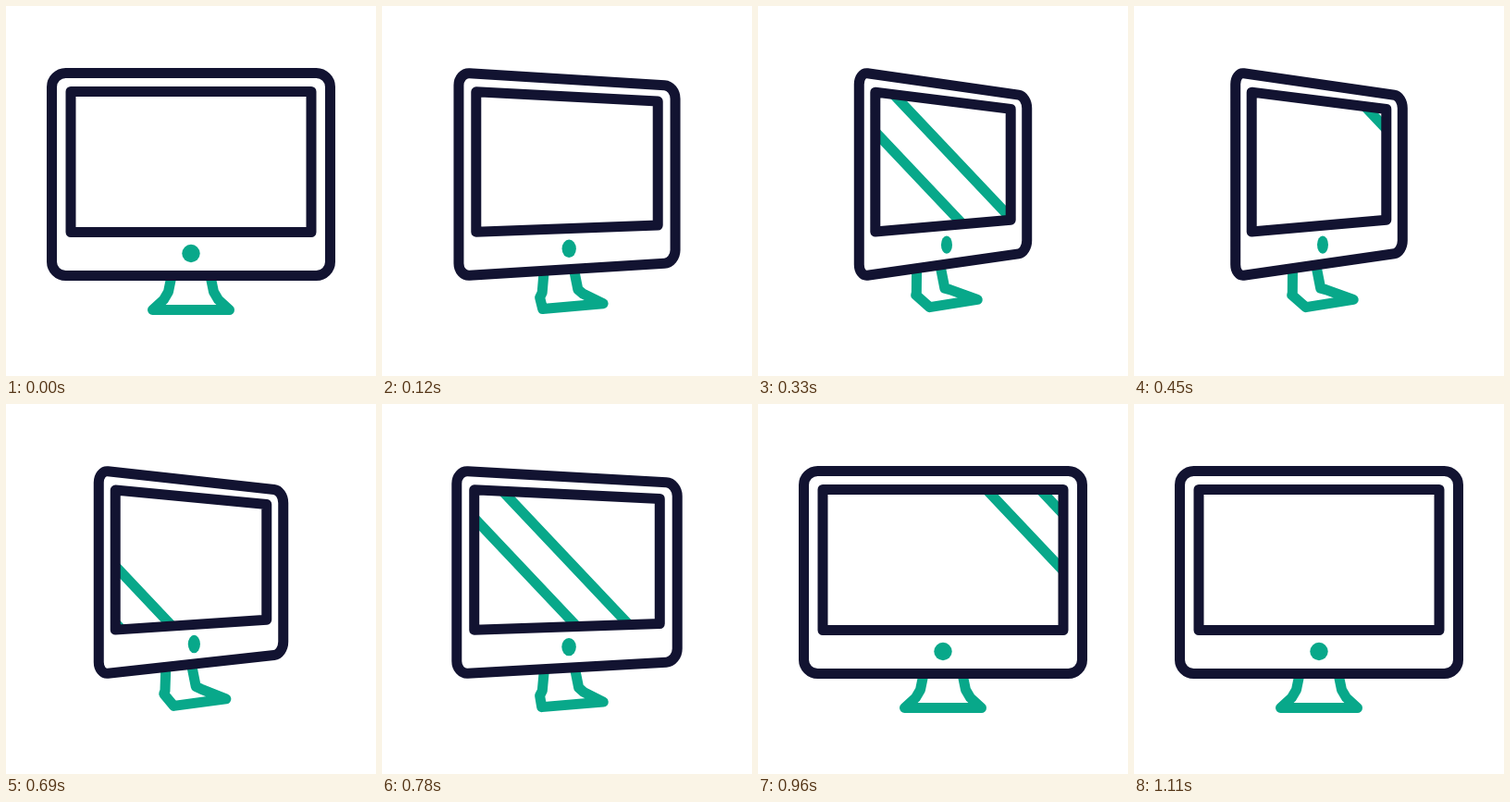
Write an HTML page with a canvas that moves like this. It is 400x400 px and loops after 1.2 s.

```html
<!DOCTYPE html>
<html lang="en">
<head>
<meta charset="utf-8">
<title>Turning monitor</title>
<style>
  html, body { margin: 0; height: 100%; overflow: hidden; background: #fff; }
  canvas { display: block; width: 100%; height: 100%; }
</style>
</head>
<body>
<canvas width="400" height="400"></canvas>
<script>
const ctx = document.querySelector('canvas').getContext('2d');
const NAVY = '#121331', GREEN = '#08a88a';
const LOOP = 1200, STEP = 30, MID = 200, EYE = 182;

// Frames are symmetric about MID; squash is their relative width when turned.
const CASE = { half: 150.5, top: 72.5, bottom: 291.5, squash: 0.6 };
const SCREEN = { half: 130, top: 92.5, bottom: 244.5, squash: 0.56 };

// Levels of the stand from top to foot; dx and dy move them when turned.
const STAND = [
  { half: 21, y: 292, dx: -15.5, dy: -6 },
  { half: 24.5, y: 309, dx: -13.5, dy: -1.5 },
  { half: 29.5, y: 317.5, dx: -11, dy: -8 },
  { half: 41.5, y: 328.5, dx: 11.5, dy: -7 }
];

const clamp = v => Math.min(1, Math.max(0, v));
const mix = (a, b, k) => a + (b - a) * k;
const smooth = v => v * v * (3 - 2 * v);

function turn(t) {
  if (t < 570) return 1 - (1 - clamp(t / 360)) ** 2;
  return 1 - clamp((t - 570) / 303) ** 2;
}

// Height shrinks toward eye level from left to right.
const depth = (x, y, k) => EYE + (y - EYE) * (1 - k * (0.11 + 0.00079 * x));

function corners({ half, top, bottom, squash }, k) {
  const at = (x, y) => [MID + x * mix(1, squash, k), depth(x, y, k)];
  return [at(-half, top), at(half, top), at(half, bottom), at(-half, bottom)];
}

function standPoints(k) {
  const side = sign => STAND.map(({ half, y, dx, dy }) => {
    const x = sign * half * mix(1, 0.62, k);
    return [MID + x + dx * k, y + (dy - 0.16 * x) * k];
  });
  return [...side(-1), ...side(1).reverse()];
}

function polyline(points, closed) {
  const path = new Path2D();
  points.forEach(p => path.lineTo(...p));
  if (closed) path.closePath();
  return path;
}

// Quad with rounded corners, rx along the sloped sides and ry along the uprights.
function roundQuad(quad, rx, ry) {
  const path = new Path2D();
  const toward = (a, b, r) => {
    const f = r / Math.hypot(b[0] - a[0], b[1] - a[1]);
    return [mix(a[0], b[0], f), mix(a[1], b[1], f)];
  };
  quad.forEach((c, i) => {
    const prev = quad[(i + 3) % 4], next = quad[(i + 1) % 4];
    const [rin, rout] = i % 2 ? [rx, ry] : [ry, rx];
    path.lineTo(...toward(c, prev, rin));
    path.bezierCurveTo(...toward(c, prev, rin * 0.45),
      ...toward(c, next, rout * 0.45), ...toward(c, next, rout));
  });
  path.closePath();
  return path;
}

function stroke(path, color) {
  ctx.strokeStyle = color;
  ctx.stroke(path);
}

// Two parallel streaks sweeping from the lower left to the upper right.
function glint(t, start, length) {
  const lead = mix(-5, 465, smooth(clamp((t - start) / length)));
  for (const x of [lead, lead - 58]) {
    stroke(polyline([[x - 104, 60], [x + 104, 280]]), GREEN);
  }
}

function draw(t) {
  const k = turn(t);
  const screen = polyline(corners(SCREEN, k), true);
  ctx.fillStyle = '#fff';
  ctx.fillRect(0, 0, 400, 400);
  ctx.lineWidth = 11;
  ctx.lineJoin = ctx.lineCap = 'round';

  stroke(polyline(standPoints(k)), GREEN);

  ctx.save();
  ctx.clip(screen);
  glint(t, 70, 540);
  glint(t, 468, 678);
  ctx.restore();

  stroke(screen, NAVY);
  stroke(roundQuad(corners(CASE, k), mix(15, 9, k), mix(15, 13, k)), NAVY);

  ctx.fillStyle = GREEN;
  ctx.beginPath();
  ctx.ellipse(MID + 4 * k, depth(0, 267.5, k), mix(9.7, 6, k), 9.7, 0, 0, 2 * Math.PI);
  ctx.fill();
}

function frame() {
  const t = performance.now() % LOOP;
  draw(Math.min(1110, Math.floor(t / STEP) * STEP));
  requestAnimationFrame(frame);
}
frame();
</script>
</body>
</html>
```
